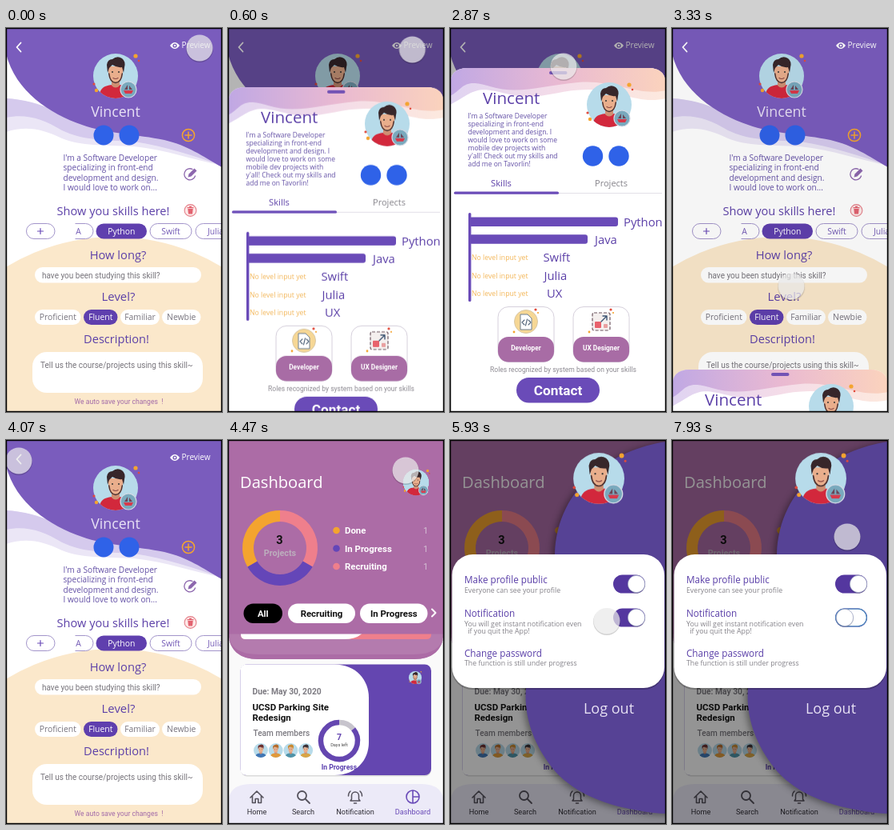
Recreate the animation shown at these times as an HTML page. Size 270 by 480 pixels, loop 8000 ms.

```html
<!DOCTYPE html>
<html lang="en">
<head>
<meta charset="utf-8">
<title>Profile app walkthrough</title>
<style>
html, body { margin: 0; width: 100%; height: 100%; overflow: hidden; background: #fff; }
svg { display: block; width: 100vw; height: 100vh; }
text { white-space: pre; }
.o { font-family: "Open Sans", "Noto Sans", sans-serif; }
.r { font-family: Roboto, Arial, sans-serif; }
.b { font-family: Roboto, Arial, sans-serif; font-weight: 700; }
.m { text-anchor: middle; }
.line { fill: none; stroke-linecap: round; stroke-linejoin: round; }
#drawer { filter: drop-shadow(-3px 2px 4px rgba(0, 0, 0, .4)); }
</style>
</head>
<body>
<svg id="stage" viewBox="0 0 270 480" preserveAspectRatio="none"></svg>
<script>
const LOOP = 8000;
const PURPLE = '#6a4bb8', MAUVE = '#ac6ca6', GOLD = '#f4a42f', PINK = '#ef7f8c', GREY = '#85838a', BLUE = '#2f62e8';
const EDGE = '#a294ca';

// Drawing helpers
const text = (x, y, size, str, fill, cls = 'o') =>
  `<text x="${x}" y="${y}" font-size="${size}" fill="${fill}" class="${cls}">${str}</text>`;
const lines = (x, y, gap, size, rows, fill) =>
  rows.map((s, i) => text(x, y + i * gap, size, s, fill)).join('');
const box = (x, y, w, h, r, fill, more = '') =>
  `<rect x="${x}" y="${y}" width="${w}" height="${h}" rx="${r}" fill="${fill}" ${more}/>`;
const dot = (x, y, r, fill, more = '') =>
  `<circle cx="${x}" cy="${y}" r="${r}" fill="${fill}" ${more}/>`;
const path = (d, fill, more = '') => `<path d="${d}" fill="${fill}" ${more}/>`;
const line = (d, color, w = 1.3) =>
  `<path d="${d}" class="line" stroke="${color}" stroke-width="${w}"/>`;
const at = (x, y, inner, scale = 1) =>
  `<g transform="translate(${x} ${y}) scale(${scale})">${inner}</g>`;
const group = (id, inner) => `<g id="${id}">${inner}</g>`;

function arc(cx, cy, r, from, to, color, w) {
  const p = a => {
    const t = (a - 90) * Math.PI / 180;
    return `${(cx + r * Math.cos(t)).toFixed(2)} ${(cy + r * Math.sin(t)).toFixed(2)}`;
  };
  const big = to - from > 180 ? 1 : 0;
  return `<path d="M${p(from)}A${r} ${r} 0 ${big} 1 ${p(to)}" fill="none" stroke="${color}" stroke-width="${w}"/>`;
}

const pill = (x, w, y, label, on, edge = 'none') =>
  box(x, y, w, 19, 9.5, on ? '#5f3fae' : '#fff', `stroke="${on ? 'none' : edge}"`) +
  text(x + w / 2, y + 13.2, 10.4, label, on ? '#fff' : edge === 'none' ? '#77737d' : '#745bb6', 'o m');

// Head and shoulders, radius 28 around the origin
function person(shirt, hair, beard) {
  return dot(0, 0, 28, '#b7dbea') +
    `<g clip-path="url(#round)">` +
    path('M-21 30C-21 13 -12 11 0 11S21 13 21 30Z', shirt) +
    path('M-5 3H5V12Q0 17 -5 12Z', '#cf8f72') +
    path('M-9 -12V-3Q-8 8 0 9Q8 8 9 -3V-12Z', '#e9ae8c') +
    (beard ? line('M-8.3 -3Q-7 8 0 8.4Q7 8 8.3 -3', '#4a3030', 1.5) + line('M-3 2.5Q0 4.5 3 2.5', '#8c4a45', 1.2) : '') +
    path('M-10 -4L-11 -14Q-10 -21 -4 -21Q2 -26 8 -22Q13 -18 11 -11L10 -4L8 -11Q2 -10 -4 -14L-8 -10Z', hair) +
    dot(-4, -5, 1, '#333') + dot(4, -5, 1, '#333') + '</g>';
}
const avatar = person('#d2283c', '#37262a', true) +
  dot(25, -25, 2.6, GOLD) + dot(29, -19, 1.3, '#e14b3c') +
  dot(-27, 10, 1.6, '#e14b3c') + dot(-24, 18, 2.2, GOLD) +
  dot(16, 17, 10, '#79a9bd', 'stroke="#d5dbe6" stroke-width="1.2"') +
  path('M10 18H22L20 22H12Z', '#d8394a') + path('M15 11V17H11ZM17 12V17H21Z', '#6b4557');

const mates = [['#4177b5', '#6b2f2f'], ['#e09a3a', '#b56a28'], ['#4f93a8', '#c98a32'], ['#d8a545', '#3b3136']]
  .map(([shirt, hair], i) => at(41 + i * 18.7, 388, person(shirt, hair), .32)).join('');

const eye = path('M-6 0Q0 -8 6 0Q0 8 -6 0Z', '#fff') + dot(0, 0, 2.6, '#7255b3') + dot(0, 0, 1.3, '#fff');

// Profile editor
const profile =
  box(0, 0, 270, 480, 0, '#fff') +
  path('M0 88C45 90 75 116 120 125H200L270 172C235 165 200 152 160 148C120 146 95 148 70 138C45 126 25 122 0 130Z', '#ebe6f6') +
  path('M0 88C45 90 75 112 120 125H200L270 172C235 160 200 148 160 142C120 140 95 140 70 128C45 113 25 107 0 112Z', '#d5caed') +
  path('M0 0H270V174C245 160 228 147 198 140C165 133 125 132 95 121C55 107 12 80 0 32Z', '#7a5cbd') +
  dot(135, 521, 260, '#fbe8cb') +
  line('M18.5 18.5L13.5 24L18.5 29.5', '#fff', 1.8) +
  at(211, 22, eye) + text(219.5, 25.4, 10, 'Preview', '#fff') +
  at(137, 60, avatar) +
  text(137, 111, 17.8, 'Vincent', '#e9e2f6', 'o m') +
  dot(122, 134, 12.5, BLUE) + dot(154, 134, 12.5, BLUE) +
  dot(228, 134, 7.6, 'none', `stroke="${GOLD}" stroke-width="1.5"`) + line('M224 134H232M228 130V138', GOLD, 1.5) +
  lines(71.5, 166, 12.4, 10.1, ["I'm a Software Developer", 'specializing in front-end', 'development and design.', 'I would love to work on...'], '#6350a6') +
  line('M233 176.5A7 7 0 1 0 236.5 185', '#8d67ae', 1.3) + path('M227.5 186.5L228.5 182.5L235.5 175.5L238.5 178.5L231.5 185.5Z', '#8d67ae') +
  text(134, 234, 14.6, 'Show you skills here!', '#5c40a8', 'o m') +
  dot(230.5, 228, 7.4, '#fde9e8', 'stroke="#e5808a" stroke-width="1.1"') +
  path('M227.3 226H233.7L233 232.5H228ZM226.5 224H234.5V225.2H226.5ZM229 222.8H232V224H229Z', '#e2626f') +
  pill(25.5, 35.5, 244.5, '', false, EDGE) + line('M39.5 254H46.5M43 250.5V257.5', PURPLE, 1.2) +
  `<g clip-path="url(#row)">` + pill(72, 37, 244.5, 'A', false, EDGE) +
  pill(112.5, 63.5, 244.5, 'Python', true) + pill(180, 52, 244.5, 'Swift', false, EDGE) + pill(237, 50, 244.5, 'Julia', false, EDGE) + '</g>' +
  text(140, 289, 14.7, 'How long?', '#5c40a8', 'o m') +
  box(36, 299, 208, 19.5, 9.7, '#fff') + text(45, 312.5, 10, 'have you been studying this skill?', '#77747b', 'r') +
  text(140.5, 341, 14.9, 'Level?', '#5c40a8', 'o m') +
  pill(36, 57.5, 352, 'Proficient') + pill(97, 42.5, 352, 'Fluent', true) + pill(143, 49, 352, 'Familiar') + pill(195, 48.5, 352, 'Newbie') +
  text(138, 393.5, 14.6, 'Description!', '#5c40a8', 'o m') +
  box(33, 405, 213, 51, 18, '#fff') + text(43, 425.3, 10, 'Tell us the course/projects using this skill~', '#77747b', 'r') +
  text(141, 470, 8.6, 'We auto save your changes  !', '#a26aa8', 'r m');

// Preview sheet
const role = (x, label, icon) =>
  box(x, 348.5, 70, 69, 13, '#fff', 'stroke="#d6d0dc" stroke-width="1"') +
  box(x, 386, 70, 31.5, 13, '#a86ca5') + text(x + 35, 403.3, 8.3, label, '#fff', 'b m') +
  dot(x + 47, 352, 1.6, '#e14b3c') + dot(x + 50, 356, 1.1, GOLD) + dot(x + 20, 380, 1.4, GOLD) + icon(x + 35, 367);
const codeIcon = (x, y) => dot(x, y, 14.5, '#f6d795', 'stroke="#d9c8a6"') +
  path(`M${x - 7} ${y - 9}h9l5 5v14h-14z`, '#fff', 'stroke="#6c7f94"') +
  line(`M${x - 2} ${y - 2}l-3 3l3 3M${x + 3} ${y - 2}l3 3l-3 3M${x + 1.5} ${y - 3}l-2 8`, '#51647a', 1.1);
const designIcon = (x, y) => box(x - 11, y - 11, 22, 22, 2, '#f4efee', 'stroke="#6d5660" stroke-width="1.2" stroke-dasharray="4 2"') +
  box(x - 8, y, 8, 8, 1, '#e8626c') + line(`M${x} ${y}l7 -7M${x + 2} ${y - 7}h5v5`, '#3c5573', 1.4) + box(x + 3, y + 3, 5, 5, 1, '#e9a0a0');
const empty = (y, x, label) =>
  text(27, y - 1, 8.7, 'No level input yet', '#f3b75a') + text(x, y + 1, 14.8, label, '#5c40a8');

const sheet =
  path('M0 490V72Q0 50 22 50H248Q270 50 270 72V490Z', '#fff') +
  `<g clip-path="url(#sheetTop)">` +
  path('M0 50H270V88C235 96 215 78 175 77S110 93 70 82S30 80 0 96Z', 'url(#blush)', 'opacity=".5"') +
  path('M0 50H270V78C235 86 205 64 160 68S85 84 50 73S18 76 0 85Z', 'url(#blush)') + '</g>' +
  box(124, 54, 22.5, 4, 2, '#7353b5') +
  text(41, 95, 20.6, 'Vincent', '#5c40a8') +
  lines(22.5, 113, 10, 8.5, ["I'm a Software Developer", 'specializing in front-end', 'development and design. I', 'would love to work on some', 'mobile dev projects with', "y'all! Check out my skills and", 'add me on Tavorlin!'], '#6350a6') +
  at(199, 96, avatar) +
  dot(178.5, 160, 12.7, BLUE) + dot(211, 160, 12.7, BLUE) +
  text(64, 198, 11.2, 'Skills', '#5c40a8', 'o m') + text(201.5, 198, 11, 'Projects', GREY, 'o m') +
  box(5, 206, 260, 1, 0, '#e3e0e8') + box(5, 204.6, 131, 3.2, 1.6, PURPLE) +
  box(23, 231, 3.4, 111, 1.5, PURPLE) + box(24, 236.5, 186, 11.5, 3, PURPLE) + box(24, 258.3, 148, 11.5, 3, PURPLE) +
  text(217, 248, 14.8, 'Python', '#5c40a8') + text(181, 270, 14.8, 'Java', '#5c40a8') +
  empty(291, 116.5, 'Swift') + empty(313.5, 117.5, 'Julia') + empty(335.5, 121, 'UX') +
  role(60, 'Developer', codeIcon) + role(154, 'UX Designer', designIcon) +
  text(141.5, 430, 8.55, 'Roles recognized by system based on your skills', '#8d8a92', 'r m') +
  box(83, 437, 104, 31.5, 15.7, PURPLE) + text(135, 458.8, 17.2, 'Contact', '#fff', 'b m');

// Dashboard
const legend = [['Done', GOLD], ['In Progress', '#6446b8'], ['Recruiting', PINK]].map(([s, c], i) => {
  const y = 113 + i * 22.5;
  return dot(135.5, y, 4.3, c) + text(146, y + 4, 11.4, s, '#fff', 'b') + text(247, y + 4, 11, '1', '#d3bfd3', 'r m');
}).join('');
const chip = (x, w, label, bg, fg) => box(x, 204.5, w, 24.5, 12.2, bg) + text(x + w / 2, 220.8, 11.4, label, fg, 'b m');
const tab = (x, label, icon, color = '#55525c') => at(x, 446, icon(color)) + text(x, 467.5, 9.2, label, color === PURPLE ? PURPLE : '#2f2d35', 'r m');
const home = c => line('M-8 1L0 -7L8 1M-5.5 -1V7.5H-1.8V2.5H1.8V7.5H5.5V-1', c, 1.6);
const search = c => line('M3 3L8 8M4 -1.5A5.5 5.5 0 1 1 -7 -1.5A5.5 5.5 0 1 1 4 -1.5', c, 1.8);
const bell = c => line('M-6 5H6L4.5 3V-1.5A4.5 4.5 0 0 0 -4.5 -1.5V3ZM-1.5 8H1.5M-8.5 -1Q-8.5 -5 -6 -7M8.5 -1Q8.5 -5 6 -7', c, 1.5);
const pie = c => line('M8 0A8 8 0 1 1 -8 0A8 8 0 1 1 8 0M0 -8V8M0 0H8', c, 1.6);

const dash =
  box(0, 0, 270, 480, 0, '#fafafa') +
  path('M0 200H270V236Q270 274 232 274H38Q0 274 0 236Z', '#b47bae') +
  path('M16 225H254V243Q254 249 248 249H22Q16 249 16 243Z', PINK) +
  path('M16 225H174Q173 249 145 249H22Q16 249 16 243Z', '#fff') +
  path('M0 0H270V242.5H0Z', MAUVE) + path('M0 236V242Q3 274 38 274H232Q267 274 270 242V236V243Q267 268 232 268H38Q3 268 0 243Z', MAUVE) +
  text(15, 60, 20.1, 'Dashboard', '#fff') +
  arc(65, 135, 40, 0, 120, PINK, 14) + arc(65, 135, 40, 120, 240, '#6446b8', 14) + arc(65, 135, 40, 240, 360, GOLD, 14) +
  text(64.5, 130, 14.5, '3', '#111', 'b m') + text(65, 145, 10.8, 'Projects', '#bcaebd', 'b m') + legend +
  chip(19.5, 48.5, 'All', '#000', '#fff') + chip(75, 84, 'Recruiting', '#fff', '#111') + chip(165, 84.5, 'In Progress', '#fff', '#111') +
  line('M255 211.5L259.5 216L255 220.5', '#fff', 2) +
  box(16, 282.5, 238, 138, 8, '#000', 'opacity=".13"') +
  box(15.5, 280.5, 238.5, 138.5, 8, '#6446b0') +
  path('M23.5 280.5H133C160 280.5 176 300 176 322V378C176 400 160 419 133 419H23.5Q15.5 419 15.5 411V288.5Q15.5 280.5 23.5 280.5Z', '#fff') +
  text(30.5, 318, 10.3, 'Due: May 30, 2020', '#7d7b82', 'b') +
  text(30.5, 338, 11.5, 'UCSD Parking Site', '#111', 'b') + text(30.5, 351.3, 11.5, 'Redesign', '#111', 'b') +
  text(31.5, 370, 10.1, 'Team members', '#7d7b82', 'r" font-weight="500') + mates +
  arc(139, 376, 23, 0, 50, '#c7c4cd', 6.5) + arc(139, 376, 23, 50, 360, '#6446b0', 6.5) +
  text(139, 375, 10.5, '7', '#6446b0', 'b m') + text(139, 382.5, 5.6, 'Days left', '#444', 'r m') +
  text(139, 412, 8.6, 'In Progress', '#5a3fae', 'b m') +
  at(234, 297, avatar, .29) +
  path('M0 480V456Q0 430 28 430H242Q270 430 270 456V480Z', '#eceaf8') +
  tab(36, 'Home', home) + tab(94, 'Search', search) + tab(159, 'Notification', bell) + tab(231, 'Dashboard', pie, PURPLE);

const drawer =
  path('M270 2C205 12 134 56 131 143C130 200 97 250 95 310C92 345 104 380 128 410C150 438 190 456 235 463Q255 467 270 467H480V2Z', '#564295') +
  text(199, 193, 18, 'Profile', '#fff', 'o m') + text(199, 267, 18, 'Settings', '#fff', 'o m') +
  text(198.5, 342, 18, 'Log out', '#e8e2f4', 'o m');

const toggle = (n, y) =>
  box(204, y - 11.5, 40, 23, 11.5, '#54379f') +
  group('off' + n, box(204.7, y - 10.8, 38.6, 21.6, 10.8, '#fff', 'stroke="#4b86bd" stroke-width="1.3"')) +
  group('knob' + n, dot(0, y + 1, 11, '#000', 'opacity=".16"') + dot(0, y, 10.7, '#fff', 'stroke="#8b94b8" stroke-width=".7"'));
const popup =
  box(2, 144, 266, 168, 26, '#000', 'opacity=".22"') + box(2.5, 143, 265.5, 167, 26, '#fff') +
  text(18, 179, 11.7, 'Make profile public', '#5a3fa8') + text(18, 190.8, 8.75, 'Everyone can see your profile', GREY) +
  text(18, 221, 11.7, 'Notification', '#5a3fa8') + text(18, 232.5, 8.75, 'You will get instant notification even', GREY) +
  text(20, 242.3, 8.75, ' if you quit the App!', GREY) +
  text(18, 271, 11.7, 'Change password', '#5a3fa8') + text(18, 282.3, 8.75, 'The function is still under progress', GREY) +
  toggle(1, 180) + toggle(2, 222);

const shade = id => group(id, box(0, 0, 270, 480, 0, '#000'));

stage.innerHTML =
  `<defs>
    <clipPath id="round"><circle r="28"/></clipPath>
    <clipPath id="row"><rect x="86.5" y="240" width="184" height="28"/></clipPath>
    <clipPath id="sheetTop"><path d="M0 120V72Q0 50 22 50H248Q270 50 270 72V120Z"/></clipPath>
    <linearGradient id="blush"><stop stop-color="#c0a8e4"/><stop offset=".5" stop-color="#e9b9d2"/><stop offset="1" stop-color="#fbd3bd"/></linearGradient>
  </defs>` +
  profile + shade('dim') + group('sheet', sheet) +
  group('dash', dash + shade('dashDim') + group('drawer', drawer) + group('face', avatar) + group('popup', popup)) +
  group('touch', dot(0, 1, 17, '#000', 'opacity=".18"') + dot(0, 0, 16.5, '#fff', 'opacity=".66"')) +
  box(.6, .6, 268.8, 478.8, 0, 'none', 'stroke="#000" stroke-width="1.2"');

// Each step is [ms, ...values]; the ends are held to fill the loop
const begin = document.timeline.currentTime;
function play(id, frame, steps) {
  const last = steps[steps.length - 1];
  const all = [[0, ...steps[0].slice(1)], ...steps, [LOOP, ...last.slice(1)]];
  const keys = all.map(([ms, ...v]) => ({ offset: ms / LOOP, easing: 'ease-in-out', ...frame(...v) }));
  const run = document.getElementById(id).animate(keys, { duration: LOOP, iterations: Infinity });
  if (begin !== null) run.startTime = begin;
}
const shift = (x, y, s = 1) => ({ transform: `translate(${x}px, ${y}px) scale(${s})` });
const fade = opacity => ({ opacity });

play('touch', shift, [
  [250, 242, 25], [1400, 182, 35], [2500, 142, 48], [2880, 142, 48], [3460, 150, 354], [3530, 150, 354],
  [3970, 16, 26], [4130, 16, 26], [4470, 222, 38], [4720, 232, 48], [4950, 232, 48], [5450, 198, 258],
  [5650, 198, 258], [5900, 196, 226], [6200, 196, 226], [6400, 224, 222], [6930, 224, 222],
  [7150, 224, 180], [7660, 224, 180], [7920, 219, 121]]);
play('sheet', shift, [[100, 0, 432], [700, 0, 0], [2880, 0, 0], [3480, 0, 432]]);
play('dim', fade, [[100, 0], [650, .3], [2880, .3], [3480, 0]]);
play('dash', fade, [[4140, 0], [4400, 1]]);
play('drawer', shift, [[4930, 185, 0], [5350, 0, 0]]);
play('dashDim', fade, [[4930, 0], [5350, .42]]);
play('face', shift, [[4930, 235, 53, .58], [5350, 186, 48, 1.14]]);
play('popup', fade, [[5660, 0], [5880, 1]]);
play('knob1', shift, [[7240, 233, 0], [7380, 216, 0], [7500, 216, 0], [7660, 233, 0]]);
play('off1', fade, [[7240, 0], [7380, 1], [7500, 1], [7660, 0]]);
play('knob2', shift, [[6430, 233, 0], [6620, 216, 0]]);
play('off2', fade, [[6430, 0], [6620, 1]]);
</script>
</body>
</html>
```
